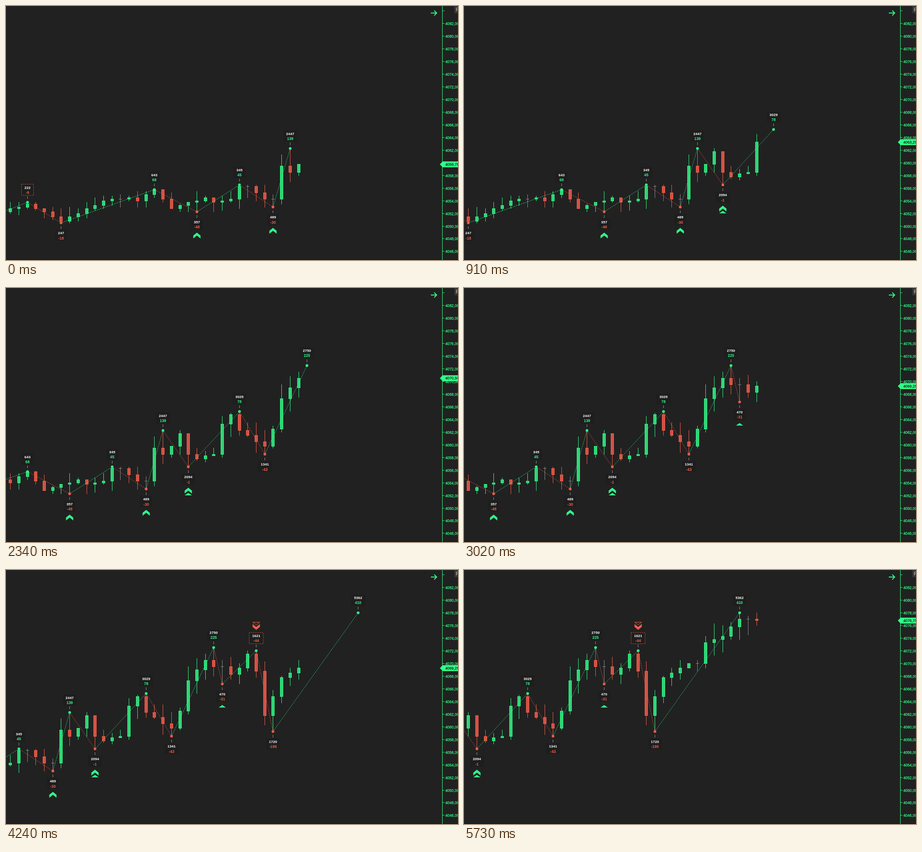
An HTML page for the animation above (5750 ms loop, 998 by 561 pixels).

```html
<!DOCTYPE html>
<html lang="en">
<head>
<meta charset="utf-8">
<title>Swing chart replay</title>
<style>
  html, body { margin: 0; width: 100%; height: 100%; overflow: hidden; background: #212121; }
  svg { display: block; width: 100%; height: 100%; font-family: "Liberation Sans", Arial, sans-serif; }
  .up { --line: #33f58a; --body: #2ed573; }
  .down { --line: #f25c49; --body: #d35244; }
  .flat { --line: #8a8a8a; }
  .bar { shape-rendering: crispEdges; }
  .wick { stroke: var(--line); }
  .body { fill: var(--body); stroke: var(--line); }
  .swing { stroke: var(--line); stroke-dasharray: 2 2; }
  .dot, .solid { fill: var(--line); }
  .hollow { fill: none; stroke: var(--line); }
  .plate { fill: #1e1e1e; }
  .frame { fill: none; stroke: #f25c49; stroke-dasharray: 2 2; }
  .link { stroke: #ccc; stroke-dasharray: 2 1; }
  .pivot text { font-weight: bold; text-anchor: middle; }
  .volume { font-size: 8px; fill: #fff; }
  .delta { font-size: 8.5px; fill: var(--line); }
  .axis { stroke: #33ff88; shape-rendering: crispEdges; }
  .price { font-size: 8.3px; fill: #33ff88; stroke: #33ff88; stroke-width: 0.25; }
  .tag path { fill: #33ff88; }
  .tag text { font-size: 8.3px; fill: #111; stroke: #111; stroke-width: 0.2; }
</style>
</head>
<body>
<svg viewBox="0 0 998 561">
  <rect width="998" height="561" fill="#212121"/>
  <g id="bars"></g>
  <g id="swings"></g>
  <g id="pivots"></g>
  <path d="M0 560.5H998" stroke="#111"/>
  <path d="M938 15.5H951M945.5 10L951 15.5L945.5 21" fill="none" stroke="#33ff88" stroke-width="1.8"/>
  <g id="scale"></g>
  <rect x="990" y="0" width="8" height="16" fill="#363636"/>
  <text x="993" y="12" font-size="10.5" fill="#ccc">F</text>
  <g id="tag" class="tag"><path d="M958 0L964 -6.5H998V6.5H964Z"/><text x="970" y="3"></text></g>
</svg>
<script>
const LOOP = 5750, LAST_X = 646.1, GAP = 18.72, TICK = 3.4965;
const FIRST_BAR = -34, LAST_BAR = 35;
const REVERSAL = 14;

// Levels are quarter points above 4050; closes between turns lie on a straight line.
const turns = [
  [-35, 9], [-32, 14], [-28, 3], [-23, 16], [-20, 18], [-19, 16], [-17, 23], [-15, 11],
  [-11, 18], [-10, 15], [-8, 17], [-7, 25], [-6, 25], [-4, 17], [-3, 17], [-2, 38],
  [-1, 34], [0, 39], [1, 47], [2, 34], [3, 31], [5, 34], [6, 53], [7, 59], [8, 49],
  [11, 39], [12, 50], [13, 69], [15, 82], [16, 78], [17, 78], [18, 73], [19, 77], [20, 86],
  [21, 75], [22, 47], [24, 71], [27, 80], [28, 80], [29, 93], [31, 97], [33, 108], [35, 107]
];

const pivots = [
  { bar: -40, level: -2, volume: 310, delta: -12 },
  { bar: -32, level: 15, volume: 222, delta: -9 },
  { bar: -28, level: 2, volume: 247, delta: -18 },
  { bar: -17, level: 23, volume: 643, delta: 68 },
  { bar: -12, level: 9, volume: 357, delta: -48, mark: "chevron" },
  { bar: -7, level: 26, volume: 345, delta: 45 },
  { bar: -3, level: 12, volume: 489, delta: -30, mark: "chevron" },
  { bar: -1, level: 49, volume: 2447, delta: 139 },
  { bar: 2, level: 26, volume: 2094, delta: -1, mark: "both" },
  { bar: 8, level: 61, volume: 3029, delta: 78 },
  { bar: 11, level: 34, volume: 1341, delta: -43 },
  { bar: 16, level: 90, volume: 2750, delta: 225 },
  { bar: 17, level: 67, volume: 470, delta: -31, mark: "triangle" },
  { bar: 21, level: 88, volume: 1621, delta: -44, mark: "both" },
  { bar: 23, level: 37, volume: 1720, delta: -195 },
  { bar: 33, level: 112, volume: 5362, delta: 410 }
];

const el = id => document.getElementById(id);
const levelY = level => 486 - level * TICK;
const rowY = level => Math.floor(levelY(level));
const barX = (bar, step) => Math.floor(LAST_X + (bar - step) * GAP) + 0.5;
const priceText = level => (4050 + level / 4).toFixed(2).replace(".", ",");

function noise(seed) {
  const v = Math.sin(seed * 12.9898) * 43758.5453;
  return v - Math.floor(v);
}

function closeAt(bar) {
  const i = Math.max(1, turns.findIndex(t => t[0] >= bar));
  const [b0, c0] = turns[i - 1], [b1, c1] = turns[i];
  return Math.round(c0 + (c1 - c0) * (bar - b0) / (b1 - b0));
}

// Wicks lengthen as trading speeds up, and stay inside the swing they belong to.
function makeBar(bar) {
  const open = closeAt(bar - 1), close = closeAt(bar);
  const reach = 5 + (bar - FIRST_BAR) * 0.08;
  const next = pivots.findIndex(p => p.bar >= bar);
  const ends = next < 0 ? [0, 112] : [pivots[next - 1].level, pivots[next].level];
  const top = Math.max(open, close), bottom = Math.min(open, close);
  let high = Math.max(top, Math.min(top + Math.round(noise(bar) * reach), ...[Math.max(...ends)]));
  let low = Math.min(bottom, Math.max(bottom - Math.round(noise(bar + 0.5) * reach), Math.min(...ends)));
  const pivot = pivots.find(p => p.bar === bar);
  if (pivot) {
    high = Math.max(high, pivot.level);
    low = Math.min(low, pivot.level);
  }
  return { bar, open, close, top, bottom, high, low };
}

// A pivot shows once price has closed far enough away from the one before it.
function revealBar(pivot, i) {
  if (pivot.bar < 0) return 0;
  const from = pivots[i - 1];
  let bar = from.bar + 1;
  while (Math.abs(closeAt(bar) - from.level) < REVERSAL) bar++;
  return bar;
}

const bars = Array.from({ length: LAST_BAR - FIRST_BAR + 1 }, (_, i) => makeBar(FIRST_BAR + i));
pivots.forEach((p, i) => {
  p.isHigh = i % 2 === 1;
  p.reveal = revealBar(p, i);
});

function drawBar(b, step) {
  const kind = b.close > b.open ? "up" : b.close < b.open ? "down" : "flat";
  const x = barX(b.bar, step), top = rowY(b.top) + 0.5;
  const body = kind === "flat"
    ? `<path class="wick" d="M${x - 3.5} ${top}h7"/>`
    : `<rect class="body" x="${x - 3}" y="${top}" width="6" height="${rowY(b.bottom) + 0.5 - top}"/>`;
  return `<g class="bar ${kind}"><path class="wick" d="M${x} ${rowY(b.high)}V${rowY(b.low) + 1}"/>${body}</g>`;
}

function drawMark({ mark, isHigh }) {
  if (!mark) return "";
  const offset = mark === "both" ? 11 : 0;
  const chevron = '<path class="solid" d="M-8 52.5L0 46L8 52.5V59L0 52.5L-8 59Z"/>';
  const triangle = `<path class="${isHigh ? "hollow" : "solid"}"
    d="M-8 ${52 + offset}L0 ${46.5 + offset}L8 ${52 + offset}Z"/>`;
  return `<g class="${isHigh ? "down" : "up"}" transform="scale(1 ${isHigh ? -1 : 1})">
    ${mark !== "triangle" ? chevron : ""}${mark !== "chevron" ? triangle : ""}</g>`;
}

function drawPivot(p, step) {
  const half = String(p.volume).length * 2.25 + 6.5;
  const side = p.isHigh ? -1 : 1;
  const plate = name =>
    `<rect class="${name}" x="${-half}" y="${p.isHigh ? -40 : 15}" width="${half * 2}" height="24.5"/>`;
  return `<g class="pivot ${p.isHigh ? "up" : "down"}" transform="translate(${barX(p.bar, step)} ${levelY(p.level)})">
    ${plate("plate")}${p.isHigh && p.delta < 0 ? plate("frame") : ""}
    <path class="link" d="M0 ${8 * side}V${13 * side}"/>
    <circle class="dot" r="3"/>
    <text class="volume" y="${p.isHigh ? -30 : 25.2}">${p.volume}</text>
    <g class="${p.delta < 0 ? "down" : "up"}"><text class="delta" y="${p.isHigh ? -19 : 36.7}">${p.delta}</text></g>
    ${drawMark(p)}</g>`;
}

function drawSwing(from, to, step) {
  return `<line class="swing ${to.isHigh ? "up" : "down"}" x1="${barX(from.bar, step)}" y1="${levelY(from.level)}"
    x2="${barX(to.bar, step)}" y2="${levelY(to.level)}"/>`;
}

function drawScale() {
  let out = '<path class="axis" d="M963.5 0V561"/>';
  for (let price = 4084; price >= 4046; price -= 2) {
    const level = (price - 4050) * 4, y = rowY(level) + 0.5;
    out += `<path class="axis" d="M964 ${y}h4"/>`;
    if (price < 4084) out += `<text class="price" x="970" y="${y + 3}">${priceText(level)}</text>`;
  }
  el("scale").innerHTML = out;
}

function render(step) {
  const shown = pivots.filter(p => p.reveal <= step);
  el("bars").innerHTML = bars.filter(b => b.bar <= step).map(b => drawBar(b, step)).join("");
  el("swings").innerHTML = shown.slice(1).map((p, i) => drawSwing(shown[i], p, step)).join("");
  el("pivots").innerHTML = shown.map(p => drawPivot(p, step)).join("");
  el("tag").setAttribute("transform", `translate(0 ${levelY(closeAt(step))})`);
  el("tag").querySelector("text").textContent = priceText(closeAt(step));
}

// The replay beats slightly slower over time and holds still on four beats in twenty.
const HOLDS = [1, 6, 11, 17];
const beatTime = beat => beat * (127.6 + 0.13 * beat) - 20;

function stepAt(time) {
  let step = 0;
  for (let beat = 1; beatTime(beat) <= time; beat++) {
    if (beat === 1 || !HOLDS.includes(beat % 20)) step++;
  }
  return Math.min(step, LAST_BAR);
}

let current = -1;
function tick() {
  const step = stepAt(performance.now() % LOOP);
  if (step !== current) render(current = step);
  requestAnimationFrame(tick);
}

drawScale();
tick();
</script>
</body>
</html>
```
